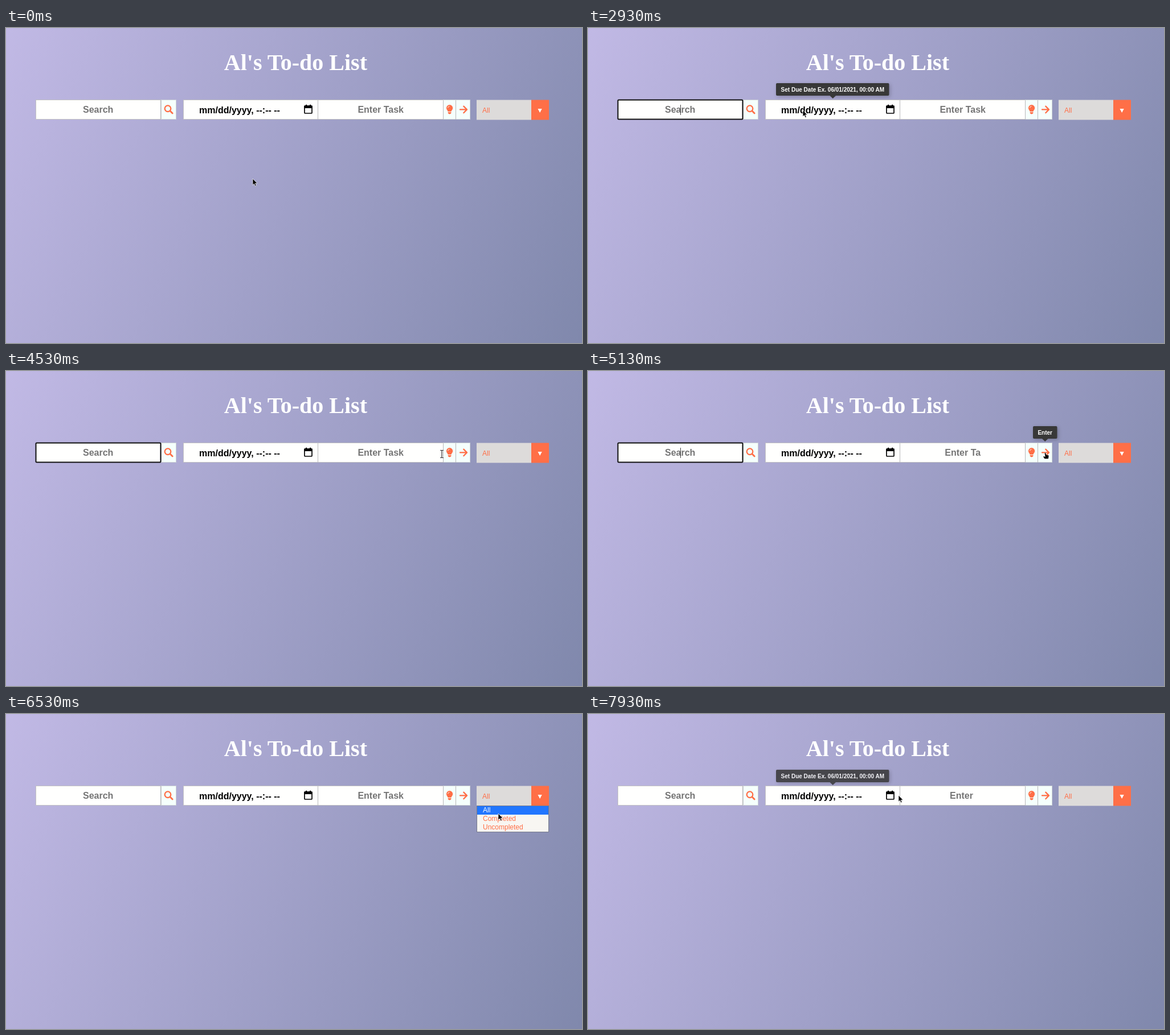
Animation, 1011 px wide and 554 px high, one loop 8 s. Source, as an HTML page:

```html
<!DOCTYPE html>
<html lang="en">
<head>
<meta charset="utf-8">
<title>To-do List</title>
<style>
  html, body { margin: 0; width: 100%; height: 100%; overflow: hidden; }
  body { background: linear-gradient(115deg, #c1b9e5, #8088ac); }
  svg { display: block; width: 100%; height: 100%; }
  text { font: bold 16px "Liberation Sans", Arial, sans-serif; }
  .title { font: bold 40px "Liberation Serif", "Times New Roman", serif; fill: #fff; text-anchor: end; }
  .hint { fill: #757575; text-anchor: middle; }
  .field { fill: #fffffe; stroke: #c2c2c2; }
  .button { fill: #f5fffc; stroke: #cdd3d5; }
  .icon { fill: none; stroke: #ff6f47; stroke-width: 2.3; stroke-linecap: round; stroke-linejoin: round; }
  .accent { fill: #ff6f47; }
  .small { font-weight: normal; font-size: 12px; }
  .tip rect, .tip path { fill: #383838; }
  .tip rect { filter: drop-shadow(2px 2px 3px rgba(0, 0, 0, .22)); }
  .tip text { font-size: 10px; fill: #fff; text-anchor: middle; }
</style>
</head>
<body>
<svg viewBox="0 0 1011 554">
  <text class="title" x="634" y="74">Al's To-do List</text>

  <rect class="field" x="52.5" y="126.5" width="219" height="34"/>
  <rect class="button" x="272.5" y="126.5" width="26" height="34"/>
  <text class="hint" x="161.7" y="149">Search</text>
  <circle class="icon" cx="284" cy="141.7" r="5.3"/>
  <path class="icon" d="M288.2 146L292.2 150" style="stroke-width:2.8"/>

  <rect class="field" x="311.5" y="126.5" width="236" height="34"/>
  <text x="339" y="150">mm/dd/yyyy, --:-- --</text>
  <rect x="524" y="137" width="13" height="13" rx="1" fill="none" stroke="#000" stroke-width="1.7"/>
  <path d="M523.5 136.5H537.5V141H523.5ZM526 134.8H528V138H526ZM533 134.8H535V138H533Z"/>

  <rect class="field" x="547.5" y="126.5" width="220" height="34"/>
  <rect class="button" x="767.5" y="126.5" width="22" height="34"/>
  <rect class="button" x="789.5" y="126.5" width="25" height="34"/>
  <path d="M547.5 127V161M767.5 127V161M789.5 127V161M271.5 127V161" stroke="#b8b8ba"/>
  <text id="task" class="hint" x="657.7" y="149"></text>
  <path class="accent" d="M775.6 147C775.4 144.8 773 144 773 140.6A5.6 5.6 0 0 1 784.2 140.6C784.2 144 781.8 144.8 781.6 147ZM775.7 148H781.5V149.3Q781 151.2 778.6 151.4Q776.2 151.2 775.7 149.3Z"/>
  <path d="M775.5 140.5Q775.7 137.8 778.5 137.6" fill="none" stroke="#f5fffc" stroke-width=".9"/>
  <path class="icon" d="M797 143.4H808.5M803.3 137.6L809 143.4L803.3 149.2"/>

  <rect x="826" y="126.5" width="96" height="35" fill="#dddbda"/>
  <rect class="accent" x="922" y="126.5" width="31" height="35"/>
  <text class="small accent" x="836" y="149">All</text>
  <path d="M933.5 142H940.7L937.1 149Z" fill="#fff"/>

  <rect id="ring" x="52.5" y="126.5" width="219" height="34" rx="1.5" fill="none" stroke="#101010" stroke-width="2"/>
  <rect id="caret" x="162" y="135" width="1" height="18" fill="#444"/>

  <g id="menu">
    <rect x="826.5" y="161.5" width="126" height="46" fill="#f8f6f2" stroke="#767a8c"/>
    <rect id="mark" x="827" width="125" height="15" fill="#2176ff"/>
    <text class="small" x="837" y="173">All</text>
    <text class="small" x="837" y="188">Completed</text>
    <text class="small" x="837" y="202.5">Uncompleted</text>
  </g>

  <g id="dateTip" class="tip">
    <rect x="330" y="97" width="198.500" height="22" rx="2"/>
    <path d="M424.500 119H435L429.700 124Z"/>
    <text x="429.300" y="111.500">Set Due Date Ex. 06/01/2021, 00:00 AM</text>
  </g>
  <g id="enterTip" class="tip">
    <rect x="781" y="97" width="42.500" height="22" rx="2"/>
    <path d="M797 119H807.500L802.200 124Z"/>
    <text x="802.200" y="111.500">Enter</text>
  </g>

  <g id="cursor" stroke-linejoin="round">
    <path id="arrow" d="M0 0V11.300L2.600 8.900L4.400 13L6.300 12.200L4.500 8.200H8Z" stroke="#fff" stroke-width=".7"/>
    <path id="beam" d="M-3 -6.500H-.8L0 -6L.8 -6.500H3M0 -6V6M-3 6.500H-.8L0 6L.8 6.500H3" fill="none" stroke="#333" stroke-width="1.200"/>
    <path id="hand" d="M-2.500 -3Q-1.500 -4 -.7 -3L.5 .3L4 1Q5 1.500 4.800 3L4 7.500H-2.500L-5 4Q-5 2.500 -3.400 3L-1.700 3.800Z" stroke="#eee" stroke-width=".5"/>
  </g>
</svg>
<script>
const LOOP = 8000;
const el = id => document.getElementById(id);
const show = (id, on) => el(id).setAttribute('visibility', on ? 'visible' : 'hidden');
const clamp = x => Math.min(1, Math.max(0, x));
const smooth = x => x * x * (3 - 2 * x);

// time, x, y of the pointer
const path = [
  [0, 433, 265], [530, 141, 140], [800, 141, 140], [980, 144.5, 140], [1620, 144.5, 140],
  [1820, 147, 135], [2330, 372, 140], [2500, 372, 140], [2800, 377, 144.5], [2930, 377, 144.5],
  [3350, 440, 145], [4130, 640, 147], [4290, 640, 147], [4530, 765, 146], [4730, 799, 146],
  [5130, 804, 147], [5400, 807, 147], [5730, 861, 150], [6000, 864, 150], [6200, 864, 151],
  [6530, 864, 175], [6730, 866, 184], [7030, 866, 184], [7250, 864, 169],
  [7670, 548, 143], [7930, 545, 143]
];

function pointer(t) {
  const i = path.findIndex(p => p[0] > t);
  if (i < 0) return path[path.length - 1].slice(1);
  const [t0, x0, y0] = path[i - 1], [t1, x1, y1] = path[i];
  const k = smooth((t - t0) / (t1 - t0));
  return [x0 + (x1 - x0) * k, y0 + (y1 - y0) * k];
}

function shape(x, y, open) {
  if (open || y < 126 || y > 161) return 'arrow';
  const within = (a, b) => x >= a && x < b;
  if (within(52, 272) || within(548, 768)) return 'beam';
  if (within(272, 299) || within(768, 815) || within(826, 953)) return 'hand';
  return 'arrow';
}

// the placeholder waits, is erased and is typed again
function typed(t) {
  const p = t % 2045, step = 50;
  if (p < 991) return 10;
  if (p < 1491) return Math.max(0, 9 - Math.floor((p - 991) / step));
  return Math.min(10, Math.floor((p - 1491) / step));
}

const ease = x => 1 - (1 - clamp(x)) ** 2.3;

function tip(id, t, enter, leave) {
  const k = t < leave ? ease((t - enter - 100) / 300) : 1 - ease((t - leave) / 300);
  el(id).setAttribute('opacity', k);
  el(id).setAttribute('transform', `translate(0 ${Math.round(8 * (1 - k))})`);
}

function draw(t) {
  const [x, y] = pointer(t);
  const open = t >= 5970 && t < 7250;
  const focused = t >= 1400 && t < 5970;

  el('task').textContent = 'Enter\u00a0Task'.slice(0, typed(t));
  show('ring', focused);
  show('caret', focused && (t - 1400) % 1200 < 600);

  show('menu', open);
  const row = y < 177 ? 0 : 1;
  el('mark').setAttribute('y', 162 + 15 * row);
  document.querySelectorAll('#menu text').forEach((item, i) =>
    item.setAttribute('fill', i === row ? '#fff' : '#ff6f47'));

  if (t < 6000) tip('dateTip', t, 2390, 3700);
  else tip('dateTip', t, 7655, LOOP);
  tip('enterTip', t, 4650, 5540);

  const kind = shape(x, y, open);
  for (const id of ['arrow', 'beam', 'hand']) show(id, id === kind);
  el('cursor').setAttribute('transform', `translate(${x} ${y})`);
}

const start = performance.now();
function tick(now) {
  draw(Math.max(0, now - start) % LOOP);
  requestAnimationFrame(tick);
}
draw(0);
requestAnimationFrame(tick);
</script>
</body>
</html>
```
